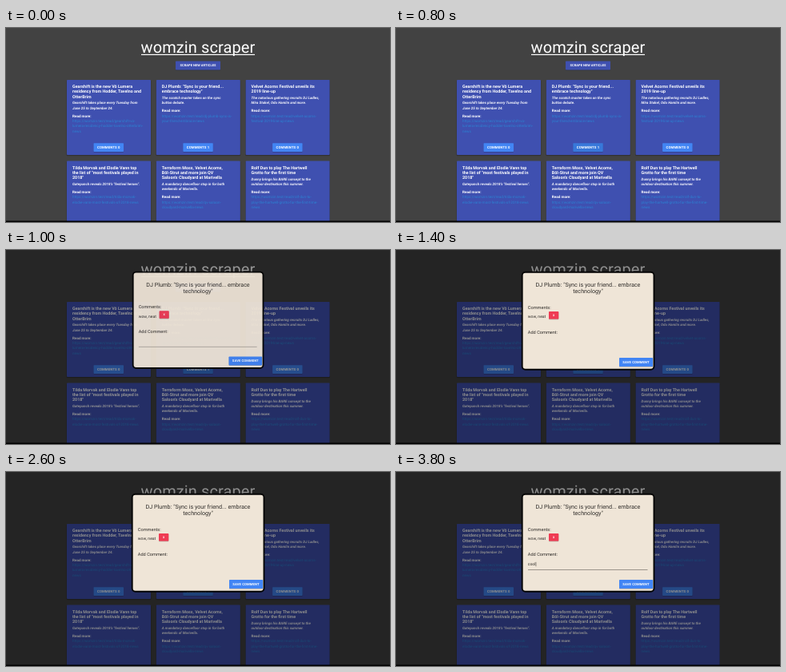
Animation, 480 px wide and 243 px high, one loop 4 s. Source, as an HTML page:

```html
<!DOCTYPE html>
<html lang="en">
<head>
<meta charset="utf-8">
<title>Article scraper</title>
<style>
  html, body { margin: 0; width: 100%; height: 100%; overflow: hidden; background: #424242; }
  svg { display: block; width: 100%; height: 100%; }
  text { font-family: Roboto, "Open Sans", sans-serif; text-rendering: geometricPrecision; white-space: pre; }
  .bold { font-weight: 700; }
  .lead { font-weight: 700; font-style: italic; }
</style>
</head>
<body>
<svg id="stage" viewBox="0 0 480 243">
  <g id="page"></g>
  <rect id="overlay" width="480" height="243" opacity="0"/>
  <g id="modal"></g>
  <rect y="241.5" width="480" height="1.5"/>
</svg>
<script>
const $ = id => document.getElementById(id);
const page = $('page'), modal = $('modal');

function add(parent, tag, attrs, content = '') {
  const node = document.createElementNS('http://www.w3.org/2000/svg', tag);
  for (const key in attrs) node.setAttribute(key, attrs[key]);
  node.textContent = content;
  parent.append(node);
  return node;
}

const box = (parent, x, y, width, height, fill, rx = 0.8, extra = {}) =>
  add(parent, 'rect', { x, y, width, height, fill, rx, ...extra });

const write = (parent, x, y, size, fill, content, extra = {}) =>
  add(parent, 'text', { x, y, 'font-size': size, fill, ...extra }, content);

function button(parent, x, y, w, h, fill, label, size, spacing = 0.1) {
  box(parent, x, y + 0.7, w, h, '#000', 0.8, { opacity: 0.22 });
  const face = box(parent, x, y, w, h, fill);
  write(parent, x + w / 2, y + h / 2 + size * 0.36, size, '#fff', label,
    { class: 'bold', 'text-anchor': 'middle', 'letter-spacing': spacing });
  return face;
}

const cards = [
  { title: ['Gearshift is the new Vö Lumera', 'residency from Hodder, Tavelno and', 'OtterBrim'],
    lead: ['Gearshift takes place every Tuesday from', 'June 25 to September 24.'],
    link: ['https://womzin.test/read/gearshift-vo-', 'lumera-residency-hodder-tavelno-otterbrim-', 'news'] },
  { title: ['DJ Plumb: "Sync is your friend...', 'embrace technology"'],
    lead: ['The scratch master takes on the sync', 'button debate.'],
    link: ['https://womzin.test/read/dj-plumb-sync-is-', 'your-friend-embrace-news'] },
  { title: ['Velvet Acorns Festival unveils its', '2019 line-up'],
    lead: ['The notorious gathering recruits DJ Ladles,', 'Mira Stokel, Odo Hamlin and more.'],
    link: ['https://womzin.test/read/velvet-acorns-', 'festival-2019-line-up-news'] },
  { title: ['Tilda Morvak and Elodie Vann top', 'the list of "most festivals played in', '2018"'],
    lead: ['Gatepunch reveals 2018\'s "festival heroes".'],
    link: ['https://womzin.test/read/tilda-morvak-', 'elodie-vann-most-festivals-of-2018-news'] },
  { title: ['Terraform Moss, Velvet Acorns,', 'Bôl-Strut and more join QV', "Saloon's Cloudyard at Marivella"],
    lead: ['A mandatory dancefloor stop in for both', 'weekends of Marivella.'],
    link: ['https://womzin.test/read/qv-saloon-', 'cloudyard-marivella-news'] },
  { title: ['Rolf Dun to play The Hartwell', 'Grotto for the first time'],
    lead: ['Dunny brings his BARE concept to the', 'outdoor destination this summer.'],
    link: ['https://womzin.test/read/rolf-dun-to-', 'play-the-hartwell-grotto-for-the-first-time-', 'news'] }
];

function drawCard({ title, lead, link }, index) {
  const x = 76 + (index % 3) * 111.8, top = index < 3 ? 65 : 166.5;
  box(page, x - 0.4, top + 0.8, 105.8, 94.5, '#000', 1, { opacity: 0.25 });
  box(page, x, top, 105, 94, '#3f50b0', 1);
  let y = top + 10;
  const lines = (list, size, fill, style, after) => {
    for (const line of list) {
      write(page, x + 7, y, size, fill, line, { class: style });
      y += 6.3;
    }
    y += after;
  };
  lines(title, 5.35, '#fff', 'bold', 1.5);
  lines(lead, 4.5, '#f2f3fb', 'lead', 3.5);
  lines(['Read more:'], 4.6, '#fff', 'bold', 0.3);
  lines(link, 4.6, '#2c82d2', '', 0);
  return button(page, x + 33.5, top + 79.3, 37.5, 10.7, '#4285f4', `COMMENTS ${index === 1 ? 1 : 0}`, 4.3);
}

box(page, 0, 0, 480, 243, '#424242', 0);
write(page, 240, 30.5, 20, '#fff', 'womzin scraper', { 'text-anchor': 'middle', 'letter-spacing': 0.1 });
box(page, 169, 32.8, 142, 1.2, '#fff', 0);
button(page, 212, 41.5, 56, 11, '#3f50b0', 'SCRAPE NEW ARTICLES', 4, 0.05);
const commentButton = cards.map(drawCard)[1];

const INK = '#302d2a';
box(modal, 157.7, 27.8, 164.8, 121.9, '#efe5d7', 4, { stroke: '#050505', 'stroke-width': 1.9 });
['DJ Plumb: "Sync is your friend... embrace', 'technology"'].forEach((line, i) =>
  write(modal, 240, 46.3 + i * 8, 7.2, INK, line, { 'text-anchor': 'middle' }));
write(modal, 164.8, 73.8, 5.6, INK, 'Comments:');
write(modal, 164.8, 85.4, 5.1, INK, 'wow, neat');
button(modal, 191, 77, 12.3, 9.6, '#ef3b53', 'X', 3.6, 0);
write(modal, 164.8, 105.4, 5.6, INK, 'Add Comment:');
const typed = write(modal, 164.8, 117.4, 5.1, INK, '');
const caret = box(modal, 165, 112.8, 0.5, 5.4, INK, 0);
const inputLine = box(modal, 165, 122.2, 149.5, 0.7, '#77716a', 0);
button(modal, 279, 135, 42, 11, '#4285f4', 'SAVE COMMENT', 4.2);

const clamp = v => Math.min(1, Math.max(0, v));
const ramp = (t, start, duration) => clamp((t - start) / duration);
const keystrokes = [[3300, 'co'], [3400, 'coo'], [3600, 'cool']];

function render(t) {
  const hover = ramp(t, 100, 500);
  commentButton.setAttribute('fill', `rgb(${66 - 10 * hover},${133 - 13 * hover},${244 - 26 * hover})`);

  const open = 1 - (1 - ramp(t, 848, 250)) ** 3;
  const scale = 0.8 + 0.2 * open;
  $('overlay').setAttribute('opacity', 0.45 * open);
  modal.setAttribute('opacity', open);
  modal.setAttribute('transform',
    `translate(240 ${88.7 - 15 * (1 - open)}) scale(${scale}) translate(-240 -88.7)`);

  typed.textContent = keystrokes.reduce((text, [at, value]) => t >= at ? value : text, '');
  const width = typed.textContent ? typed.getComputedTextLength() : 0;
  caret.setAttribute('x', 165 + width);
  caret.setAttribute('opacity', t >= 2800 ? 1 : 0);
  inputLine.setAttribute('opacity', t < 1300 ? 0.7 : ramp(t, 2700, 400));
}

const start = performance.now();
function tick() {
  const t = (performance.now() - start) % 4000;
  render(Math.floor(t / 100) * 100);
  requestAnimationFrame(tick);
}
tick();
</script>
</body>
</html>
```
